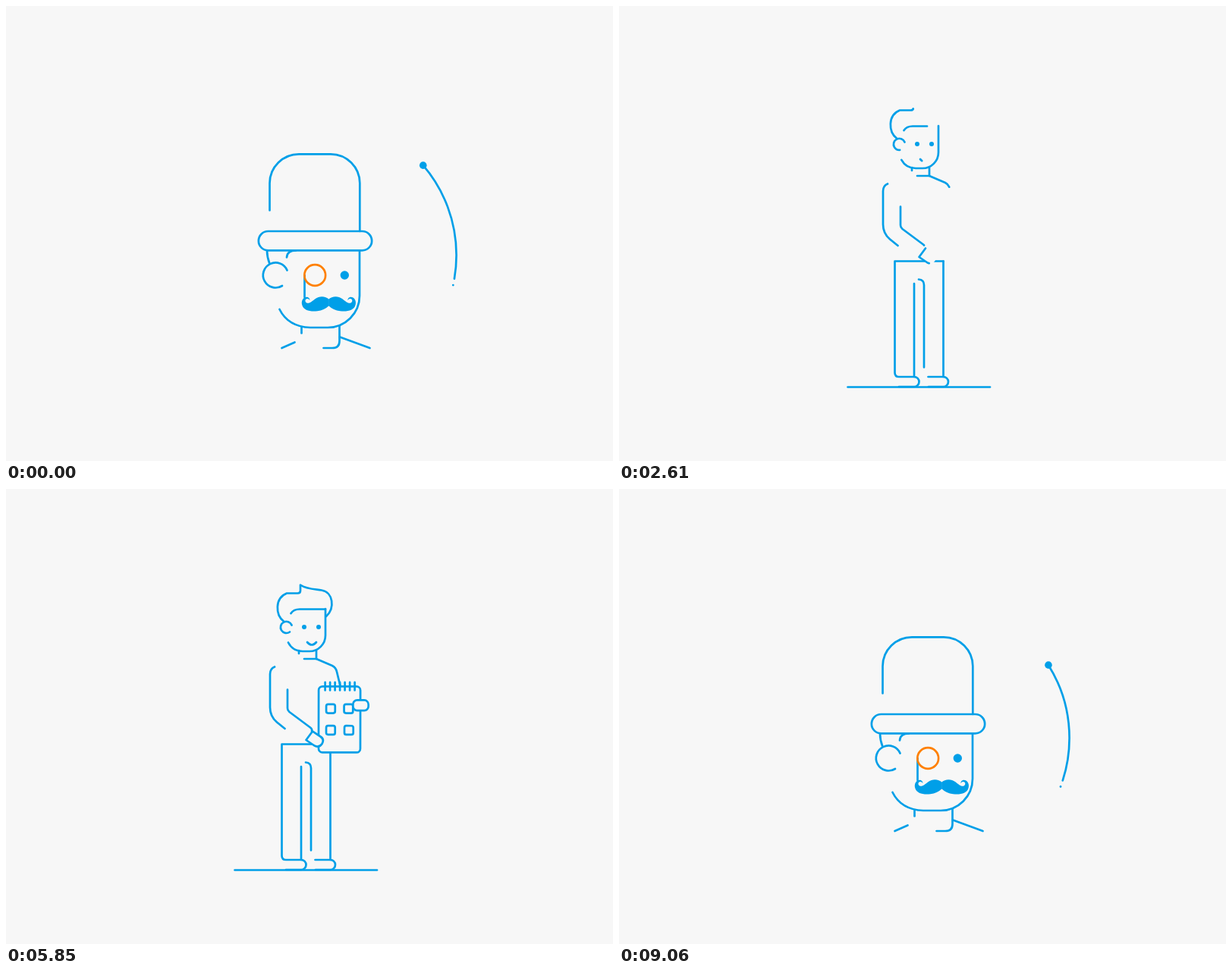
An HTML page for the animation above (9.09 s loop, 800 by 600 pixels).

```html
<!DOCTYPE html>
<html lang="en">
<head>
<meta charset="utf-8">
<title>Line man</title>
<style>
html,body{margin:0;width:100%;height:100%;overflow:hidden;background:#f7f7f7}
svg{display:block;width:100vw;height:100vh}
</style>
</head>
<body>
<svg id="stage" viewBox="0 0 800 600" fill="none" stroke="#009fe8" stroke-width="2.7" stroke-linecap="round" stroke-linejoin="round">
<defs><clipPath id="floor"><rect width="800" height="503.5"/></clipPath></defs>
</svg>
<script>
const LOOP = 9090, BG = '#f7f7f7', BLUE = '#009fe8', ORANGE = '#ff8000', RED = '#ff6f10';
const stage = document.getElementById('stage');

function add(parent, tag, attrs) {
  const el = document.createElementNS('http://www.w3.org/2000/svg', tag);
  for (const k in attrs) el.setAttribute(k, attrs[k]);
  parent.appendChild(el);
  return el;
}
const set = (el, k, v) => el.setAttribute(k, v);
const group = (parent, attrs) => add(parent, 'g', attrs);
const line = (parent, d, attrs) => add(parent, 'path', { d, pathLength: 1, ...attrs });
const dot = (parent, cx, cy, r, attrs) => add(parent, 'circle', { cx, cy, r, fill: BLUE, stroke: 'none', ...attrs });
const box = (parent, x, y, width, height, rx, attrs) => add(parent, 'rect', { x, y, width, height, rx, ...attrs });

const clamp = v => Math.max(0, Math.min(1, v));
const ramp = (t, a, b) => clamp((t - a) / (b - a));
const inOut = p => p * p * (3 - 2 * p);
const outCubic = p => 1 - (1 - p) ** 3;
const outBack = (p, s = 1.7) => 1 + (s + 1) * (p - 1) ** 3 + s * (p - 1) ** 2;
const mix = (a, b, p) => a + (b - a) * p;

function show(el, on) { set(el, 'display', on ? 'inline' : 'none'); }
function draw(el, p) {
  show(el, p > 0);
  set(el, 'stroke-dasharray', p >= 1 ? 'none' : `${p} 2`);
}
// grow between a and b, shrink between c and d
const life = (t, a, b, c, d) => inOut(ramp(t, a, b)) * (1 - inOut(ramp(t, c, d)));

/* ---------- standing man ---------- */
const man = group(stage);
const body = group(man);
const legs = [
  'M301.5 502.5H489',
  'M407.5 489H427.5A6.5 6.5 0 0 1 427.5 502H408',
  'M427.5 336.5V489',
  'M427.5 336.5H363.5V483.5Q363.5 489 369 489H389A6.5 6.5 0 0 1 389 502H369',
  'M389 489V366',
  'M395 360.5Q402 361 402 368V476.5'
].map(d => line(body, d));
const leftArm = [
  'M354 234.5Q348 237 348 244V288Q348 300 357 307.5L367.5 316',
  'M371 264.5V289Q371 292 373.5 294L401 314.5Q404 317 403 319'
].map(d => line(body, d));
const rightArm = line(body, '');
const head = [
  'M386 213V217',
  'M409 213V224H393',
  'M421 158V193A21 21 0 0 1 400 214H391Q378 214 372 202.5',
  'M376.5 179.5A7.6 7.6 0 1 0 374 188.5',
  'M375.5 164Q379 158.5 387 158.5H421',
  'M366 174.5C355 166 354 144 370 137.5H384.5Q388 137.5 388 134V126.5C396 132 406 132 416 133.5C431 136 434 157 422 168',
  'M397 202Q403 209 409 202'
].map(d => line(body, d));
const eyes = [393, 412].map(x => dot(body, x, 182, 3));
const glasses = [
  line(body, 'M379.5 179.5L388 182'),
  line(body, 'M398 182H407'),
  ...[393, 412].map(x => line(body, `M${x - 4.8} 182a4.8 4.8 0 1 1 9.6 0a4.8 4.8 0 1 1 -9.6 0`, { fill: BG, 'stroke-width': 3.2 }))
];

/* ---------- devices ---------- */
const floor = group(man, { 'clip-path': 'url(#floor)' });

const tablet = group(floor);
line(tablet, 'M427.5 346.5Q434 347 436 343');
box(tablet, 413.5, 255.7, 55, 87.3, 5, { fill: BG });
const axes = ['M422.5 333.5V266', 'M422.5 333.5H460'].map(d => line(tablet, d));
const chart = line(tablet, 'M424 330L429.5 313.5L439.5 307L442 291L452 285L459 268', { stroke: ORANGE });
const nodes = [[429.5, 313.5, 0.22], [442, 291, 0.58]].map(([x, y, at]) => ({ at, el: dot(tablet, x, y, 3, { fill: ORANGE }) }));
const origin = dot(tablet, 422.5, 333.5, 2.8, { fill: BG, stroke: BLUE, 'stroke-width': 2 });

const laptop = group(floor);
box(laptop, 408.5, 272.5, 83.5, 64, 5, { fill: BG });
line(laptop, 'M414.5 280H482Q485 280 485 283V317.5Q485 320.5 482 320.5H414.5');
line(laptop, 'M421.5 326.5H491');
box(laptop, 419.5, 293.3, 27.5, 21.7, 2.5);
['M430 286.5H481', 'M451.5 294.5H481', 'M451.5 302.5H481'].forEach(d => line(laptop, d, { stroke: RED, 'stroke-width': 2.4 }));
line(laptop, 'M449.5 343.5H458Q461 343.5 461 340Q461 331.5 453.8 331.5Q446.7 331.5 446.7 340Q446.7 343.5 449.5 343.5Z', { fill: BG });

const pad = group(floor);
box(pad, 412, 261, 55, 87, 5, { fill: BG });
for (let i = 0; i < 7; i++) line(pad, `M${420.5 + i * 6.5} 255.5V266`);
[[422, 284.5], [445.5, 284.5], [422, 312.8], [446, 312.8]].forEach(([x, y]) => box(pad, x, y, 11.7, 11.7, 2.5));
const checks = [[422, 286], [445.5, 286], [422, 314.3]].map(([x, y]) => {
  const d = `M${x} ${y}l5.7 6l9.8 -14`;
  return [line(pad, d, { stroke: BG, 'stroke-width': 7, 'stroke-linecap': 'butt' }), line(pad, d, { stroke: ORANGE })];
});
box(pad, 457.3, 279, 20.3, 13.7, 5.5, { fill: BG });

const hand = line(man, 'M404 319.5L395.5 331L406.5 338.5Q413 341.5 416.5 336Q420 330 414.5 326.5Z', { fill: BG });

/* ---------- hat man ---------- */
const gent = group(stage);
const face = group(gent);
const faceLines = [
  'M466 322.5V382A42 42 0 0 1 424 424H401Q372 423 360.5 400',
  'M370.5 348.5A16.5 16.5 0 1 0 364 369',
  'M344 322.5Q344 331 347.5 340',
  'M389.5 424V431.5',
  'M439.5 422V442Q439.5 451 430 451H418.5',
  'M363.5 451L380.5 443.5'
].map(d => line(face, d));
const shoulder = line(face, 'M440 436.5L479.5 451');
const bigEye = dot(face, 446.3, 355, 5.7);
const smile = line(face, 'M415 398Q426.5 408 438 398');
const sleeve = line(gent, 'M488 600L478.5 545');
const monocle = group(gent);
const cord = line(monocle, 'M393.5 355V384');
const lens = line(monocle, 'M393.3 355a13.9 13.9 0 1 1 27.8 0a13.9 13.9 0 1 1 -27.8 0', { stroke: ORANGE });
const fringe = line(gent, 'M370 331.5Q370.5 322.5 382 322.5');
const dome = line(gent, 'M347.5 269.5V233.5A38.5 38.5 0 0 1 386 195.3H428A38.5 38.5 0 0 1 466.3 233.5V297');
const brim = line(gent, 'M417 297H469.5A12.5 12.5 0 0 1 469.5 322.3H345.5A12.5 12.5 0 0 1 345.5 297H417');
const whiskers = group(gent, { fill: BLUE, stroke: 'none' });
[1, -1].forEach(side => add(whiskers, 'path', {
  transform: `scale(${side} 1)`,
  d: 'M-.2 -5.5C4 -9.5 12 -10.5 18 -6C22 -3 26 1 29.5 -1C32 -3 31 -6.5 28 -6.3C26.8 -6.2 26 -5.5 25 -4.3C24.8 -8 29 -9.5 31.5 -8C35 -6 36.5 -2 35 2.5C33 9 25 11 15 10C9 9.3 4 7 -.2 3Z'
}));

/* ---------- running lines ---------- */
function makeComet(d) {
  const g = group(stage), path = add(g, 'path', { d });
  return { g, path, total: path.getTotalLength(), tip: dot(g, 0, 0, 4), crumb: dot(g, 0, 0, 1.4) };
}
function place(el, path, s, r) {
  const p = path.getPointAtLength(s);
  set(el, 'cx', p.x); set(el, 'cy', p.y); set(el, 'r', r);
}
function run(c, from, to, r, crumb) {
  const a = Math.max(0, from), b = Math.min(c.total, to);
  show(c.g, b - a > 0.5);
  if (b - a <= 0.5) return;
  set(c.path, 'stroke-dasharray', `${b - a} ${c.total * 2}`);
  set(c.path, 'stroke-dashoffset', -a);
  place(c.tip, c.path, b, r);
  place(c.crumb, c.path, Math.max(0, from - 8), crumb && from > 8 ? 1.4 : 0);
}
const R = 181.6, CX = 412, CY = 328.5, RAD = Math.PI / 180;
const arc = deg => `A${R} ${R} 0 0 0 ${CX + R * Math.cos(deg * RAD)} ${CY - R * Math.sin(deg * RAD)}`;
const orbit = makeComet(`M643 443C636 380 590 297 465 297H330C270 297 243 345 243 385C243 455 330 ${CY + R} ${CX} ${CY + R}`
  + [0, 90, 180, 270, 360, 409].map(arc).join(''));
const orbitBase = orbit.total - 499 * RAD * R;
const upper = makeComet('M-300 265C-130 265 -60 302 0 347C70 395 120 502.5 285 502.5H489');
const lower = makeComet('M-300 290C-130 290 -20 352 64 433.5C120 487 180 521 270 521H440');

function runOrbit(t) {
  const w = t < 1500 ? t + LOOP : t;
  show(orbit.g, w > 7650);
  if (w <= 7650) return;
  const u = (9060 - w) / 1000;
  const to = orbitBase + 122 * RAD * R - 911 * u + (u > 0 ? 81 * u * u : 0);
  const len = w < 9060 ? mix(291, 159, ramp(w, 8040, 9060)) : 159 + (w - 9060) * 0.06;
  const end = ramp(w, 10330, 10560);
  run(orbit, mix(to - len, orbit.total, end), to, 4.8 * (1 - ramp(w, 9100, 9220)), w > 8350 && !end);
}
function runPair(t) {
  const on = t > 1150 && t < 2250;
  const up = upper.total, lo = lower.total;
  const k = 0.9 * (t - 1650);
  run(upper, Math.min(up - 188, up - 669 + k), on ? up - 53 + k : 0, 4 * (1 - ramp(t, 1710, 1860)), false);
  if (!on) show(upper.g, false);
  run(lower, lo - 398 + k, on ? lo - 148 + k : 0, 4 * (1 - ramp(t, 1740, 1870)), true);
}

/* ---------- scenes ---------- */
const drop = (t, a, b) => ramp(t, a, b) ** 2;

function drawMan(t) {
  const on = t > 1900 && t < 8360;
  show(man, on);
  if (!on) return;
  const z = inOut(ramp(t, 7420, 7860));
  const k = 1 + 1.13 * z;
  set(man, 'transform', `matrix(${k} 0 0 ${k} ${-432 * z} ${-35.7 * z})`);
  set(man, 'stroke-width', 2.7 / k);

  legs.forEach((el, i) => draw(el, i
    ? life(t, 1900 + i * 60, 2220 + i * 60, 7380 + i * 20, 7650 + i * 20)
    : t < 2170 ? 0 : 1 - inOut(ramp(t, 7380, 7680))));
  leftArm.forEach((el, i) => draw(el, life(t, 2250 + i * 60, 2600 + i * 60, 8060, 8340)));
  head.forEach((el, i) => draw(el, i < 4 || i === 6
    ? (t < 7860 ? inOut(ramp(t, 2300 + i * 40, 2540 + i * 40)) : 0)
    : life(t, 2300 + i * 40, 2540 + i * 40, 7420, 7820)));
  eyes.forEach((el, i) => {
    const out = i ? +(t < 7860) : 1 - ramp(t, 7650, 7820);
    set(el, 'r', 3 * clamp(outBack(ramp(t, 2500, 2750))) * out);
  });

  const toLap = inOut(ramp(t, 3900, 4300)), toPad = inOut(ramp(t, 5350, 6000));
  const ax = mix(mix(436, 444, toLap), 440.5, toPad), ay = mix(mix(255.5, 271, toLap), 260, toPad);
  set(rightArm, 'd', `M409 224L430 233Q434.7 235.3 436 241L${ax} ${ay}`);
  draw(rightArm, life(t, 2400, 2750, 7450, 7860));
  glasses.forEach((el, i) => draw(el, life(t, 3900 + i * 40, 4200 + i * 40, 4930, 5250)));
  draw(hand, life(t, 2450, 2780, 7600, 7860));

  const tIn = ramp(t, 2820, 3240), tb = outBack(tIn), tOut = drop(t, 3800, 4090);
  show(tablet, tIn > 0 && tOut < 1);
  set(tablet, 'transform', `translate(${-8 * tOut} ${250 * tOut}) rotate(${-55 * (1 - tb) - 12 * tOut} 414 335) translate(414 335) scale(${Math.max(0.01, tb)}) translate(-414 -335)`);
  axes.forEach(el => draw(el, ramp(t, 3310, 3710)));
  const cp = ramp(t, 3366, 3766);
  draw(chart, cp);
  nodes.forEach(n => show(n.el, cp > n.at));
  show(origin, t > 3310);

  const lIn = ramp(t, 3960, 4350), lOut = drop(t, 4900, 5230);
  show(laptop, lIn > 0 && lOut < 1);
  set(laptop, 'transform', `translate(0 ${235 * lOut}) rotate(${14 * lOut} 450 305) translate(413 333) scale(${Math.max(0.01, outBack(lIn, 1.4))}) translate(-413 -333)`);

  const pIn = ramp(t, 5450, 6120), pb = outBack(pIn, 0.7), pOut = drop(t, 7360, 7620);
  show(pad, pIn > 0 && pOut < 1);
  set(pad, 'transform', `translate(${-14 * (1 - pb)} ${245 * (1 - pb) + 245 * pOut}) rotate(${-40 * (1 - pb)} 440 305)`);
  checks.forEach((pair, i) => pair.forEach(el => draw(el, outCubic(ramp(t, 6140 + i * 180, 6420 + i * 180)))));
}

function drawGent(t) {
  const on = t >= 7700 || t < 1200;
  show(gent, on);
  if (!on) return;
  const w = t < 1200 ? t + LOOP : t;
  const out = (i = 0) => 1 - inOut(ramp(w, LOOP + 680 + i * 25, LOOP + 960 + i * 25));
  const lift = -3.6 * (1 - inOut(ramp(w, 8040, 8380)));
  set(face, 'transform', `translate(0 ${lift})`);
  faceLines.forEach((el, i) => draw(el, (w >= 7860 ? 1 : 0) * out(i)));
  draw(shoulder, (w >= 7860 ? mix(0.3, 1, ramp(w, 7860, 8220)) : 0) * out(4));
  set(bigEye, 'r', w < 7860 ? 0 : 5.7 * out(3));
  draw(smile, w >= 7860 && w < 8150 ? 1 : 0);
  draw(sleeve, life(w, 7760, 7960, 8070, 8320));

  set(monocle, 'transform', `translate(0 ${-8 * (1 - inOut(ramp(w, 8040, 8260)))})`);
  draw(lens, inOut(ramp(w, 7780, 8000)) * out(2));
  draw(cord, inOut(ramp(w, 7860, 8020)) * out(1));

  draw(brim, inOut(ramp(w, 8050, 8420)) * out(5));
  draw(fringe, inOut(ramp(w, 8260, 8420)) * out(2));
  const rise = ramp(w, 8260, 8660);
  draw(dome, rise > 0 ? out(6) : 0);
  const sy = Math.max(0.01, outBack(rise, 2));
  set(dome, 'transform', `matrix(1 0 0 ${sy} 0 ${297 * (1 - sy)})`);

  const m = ramp(w, 7900, 8133) * out(2);
  show(whiskers, m > 0);
  set(whiskers, 'transform', `translate(425.4 ${392.3 + lift}) scale(${m})`);
}

function render(t) {
  drawMan(t);
  drawGent(t);
  runOrbit(t);
  runPair(t);
}
let start = null;
function tick(now) {
  if (start === null) start = now;
  render((now - start) % LOOP);
  requestAnimationFrame(tick);
}
render(0);
requestAnimationFrame(tick);
</script>
</body>
</html>
```
